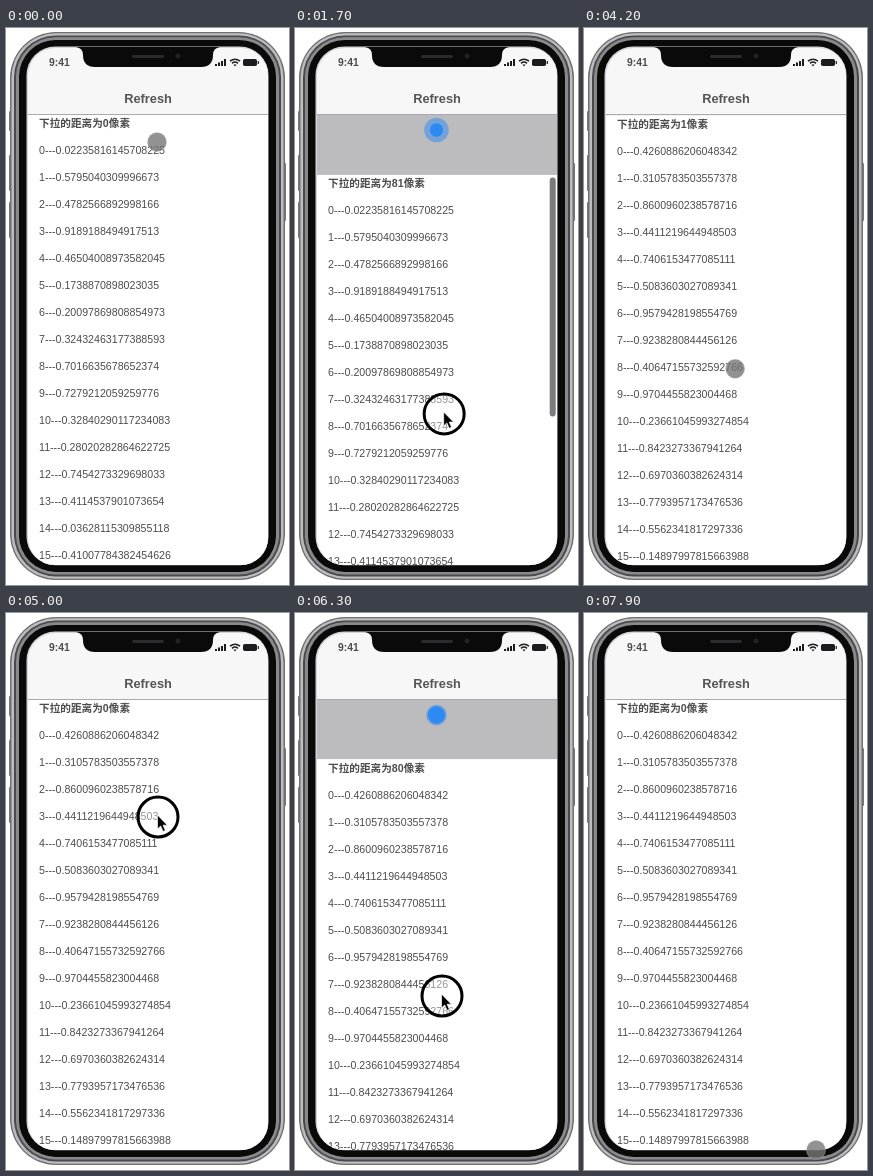
Recreate the animation shown at these times as an HTML page. Size 283x557 px, loop 8000 ms.

```html
<!DOCTYPE html>
<html lang="zh">
<head>
<meta charset="utf-8">
<title>Refresh</title>
<style>
  html, body { margin: 0; width: 100%; height: 100%; overflow: hidden; background: #fff; }
  svg { display: block; width: 283px; height: 557px; }
  text { font-family: "Liberation Sans", "Noto Sans CJK SC", "Noto Sans CJK", sans-serif; font-size: 10.65px; fill: #4c4c4c; }
  .bold { font-weight: bold; }
</style>
</head>
<body>
<svg viewBox="0 0 283 557">
  <defs>
    <clipPath id="screen"><rect x="22" y="20" width="240" height="517" rx="27"/></clipPath>
  </defs>

  <!-- phone body -->
  <g fill="#77777b">
    <rect x="3" y="83" width="4" height="20" rx="1"/>
    <rect x="3" y="127" width="4" height="36" rx="1"/>
    <rect x="3" y="174" width="4" height="36" rx="1"/>
    <rect x="276" y="135" width="4" height="58" rx="1"/>
  </g>
  <g id="body"></g>

  <!-- screen -->
  <g clip-path="url(#screen)">
    <rect x="22" y="20" width="240" height="517" fill="#bcbcbf"/>
    <g id="dot" fill="#2d8af3">
      <circle id="halo" cx="141.5" cy="102" opacity=".5"/>
      <circle id="core" cx="141.5" cy="102"/>
    </g>
    <g id="list">
      <rect x="22" y="86.5" width="240" height="560" fill="#fff"/>
      <text id="label" class="bold" x="33" y="99"></text>
      <g id="rows"></g>
      <rect id="bar" x="254.7" y="89" width="6" height="239" rx="3" fill="#7c7c7e"/>
    </g>
    <rect x="22" y="20" width="240" height="66" fill="#f7f7f8"/>
    <rect x="22" y="86" width="240" height="1" fill="#aaaaad"/>
    <text class="bold" x="142" y="75" text-anchor="middle" style="font-size:12.8px;fill:#555">Refresh</text>
    <text class="bold" x="43" y="38" style="font-size:10.3px">9:41</text>
    <g fill="#1c1c1e">
      <path d="M209 36h2v2h-2zM212 34.5h2v3.5h-2zM215 33h2v5h-2zM218 31h2v7h-2z"/>
      <path d="M224 33.2q5-4 10 0M226 35.3q3-2.4 6 0" fill="none" stroke="#1c1c1e" stroke-width="1.5"/>
      <path d="M227.4 36.6h3.2L229 38.5z"/>
      <rect x="237" y="31" width="14" height="7" rx="1.8"/>
      <rect x="251.7" y="33" width="1.2" height="3"/>
    </g>
  </g>
  <path d="M70 19h144q-7 1-7 8q0 12-12 12H89q-12 0-12-12q0-7-7-8z" fill="#0a0a0b"/>
  <rect x="126" y="27" width="32" height="3" rx="1.5" fill="#2b2b2d"/>
  <circle cx="172" cy="28" r="2.5" fill="#222226"/>

  <!-- pointer -->
  <g id="pointer">
    <circle id="idle" r="9.5" fill="#777" fill-opacity=".8" stroke="#bbb" stroke-opacity=".4"/>
    <g id="press">
      <circle r="20" fill="#fff" fill-opacity=".4" stroke="#000" stroke-width="3"/>
      <path d="M-.5-2v14l3.2-3 2.3 5.4 2.4-1-2.3-5.2h4.3z" fill="#000" stroke="#fff" stroke-width=".7"/>
    </g>
  </g>
</svg>

<script>
const LOOP = 8000, STEP = 100;
const SCALE = 0.743;            // drawn size of one page pixel
const THRESHOLD = 60;           // pull that triggers a refresh
const GRIP = 204;               // where the finger takes hold of the list
const REFRESHED = 3900;
const el = id => document.getElementById(id);

// Text of the rows before and after the refresh
const before = `0.02235816145708225 0.5795040309996673 0.4782566892998166 0.9189188494917513
  0.46504008973582045 0.1738870898023035 0.20097869808854973 0.32432463177388593
  0.7016635678652374 0.7279212059259776 0.32840290117234083 0.28020282864622725
  0.7454273329698033 0.4114537901073654 0.03628115309855118 0.41007784382454626`;
const after = `0.4260886206048342 0.3105783503557378 0.8600960238578716 0.4411219644948503
  0.7406153477085111 0.5083603027089341 0.9579428198554769 0.9238280844456126
  0.40647155732592766 0.9704455823004468 0.23661045993274854 0.8423273367941264
  0.6970360382624314 0.7793957173476536 0.5562341817297336 0.14897997815663988`;

// Pointer strokes, each easing on from the end of the one before
const strokes = [
  { from: 200, to: 500, x: 152, y: 260 },
  { from: 600, to: 1000, x: 150, y: 272 },
  { from: 1100, to: 1900, x: 149, y: 407 },
  { from: 2000, to: 2500, x: 151, y: 366 },
  { from: 4000, to: 4800, x: 152, y: 204 },
  { from: 5000, to: 6000, x: 147, y: 383 },
  { from: 6300, to: 6800, x: 159, y: 254 },
  { from: 7100, to: 7900, x: 232, y: 537 },
];

const clamp = u => Math.min(1, Math.max(0, u));
const smooth = u => u * u * (3 - 2 * u);
const within = (t, from, to) => t >= from && t < to;
const show = (id, on) => el(id).setAttribute("visibility", on ? "visible" : "hidden");

function pointerAt(t) {
  let x = 151, y = 114;
  for (const s of strokes) {
    const u = smooth(clamp((t - s.from) / (s.to - s.from)));
    x += (s.x - x) * u;
    y += (s.y - y) * u;
  }
  return { x, y };
}

// Rubber band: the further the finger, the less the list follows
function stretch(t) {
  const size = 440, travel = Math.max(0, pointerAt(t).y - GRIP);
  return size * (1 - 1 / (1 + 0.385 * travel / size)) / SCALE;
}

// Spring back after a release
const settle = (t, start, from, to) => to + (from - to) * (1 - clamp((t - start) / 400)) ** 3;

function pullAt(t) {
  if (within(t, 700, 2500) || within(t, 5000, 7200)) return stretch(t);
  if (within(t, 2500, REFRESHED)) return settle(t, 2500, stretch(2500), THRESHOLD);
  if (within(t, REFRESHED, 5000)) return settle(t, REFRESHED, THRESHOLD, 0);
  return t < 700 ? 0 : settle(t, 7200, stretch(7100), 0);
}

// Nested outlines from the metal rim to the edge of the glass
function drawBody() {
  const rims = { 4: "#6f6f73", 5.5: "#bdbdc1", 8: "#4a4a4d", 10: "#8a8a8d", 13: "#0a0a0b", 20.5: "#d4d4d6" };
  el("body").innerHTML = Object.entries(rims).sort((a, b) => a[0] - b[0]).map(([inset, color]) => {
    const d = inset - 4, top = 4 + d * 0.88;
    return `<rect x="${inset}" y="${top}" width="${275 - 2 * d}" height="${548 - 1.78 * d}"
      rx="${46 - d * 1.05}" fill="${color}"/>`;
  }).join("");
}

let shown;
function fillRows(data) {
  if (data === shown) return;
  shown = data;
  el("rows").innerHTML = data.split(/\s+/)
    .map((n, i) => `<text x="33" y="${126 + 27 * i}">${i}---${n}</text>`).join("");
}

function draw(t) {
  const pull = pullAt(t), { x, y } = pointerAt(t);
  const pressed = within(t, 500, 2500) || within(t, 4900, 7200);

  fillRows(t < REFRESHED ? before : after);
  el("label").textContent = `下拉的距离为${Math.round(pull)}像素`;
  el("list").setAttribute("transform", `translate(0 ${pull * SCALE})`);
  el("bar").setAttribute("opacity", t < 700 ? 0 : clamp((2900 - t) / 400));

  const swell = 2.8 * Math.abs(Math.cos(Math.PI * (t - 1700) / 1000));
  el("halo").setAttribute("r", 9.5 + swell);
  el("core").setAttribute("r", 9.5 - swell);
  show("dot", pull >= THRESHOLD);

  el("pointer").setAttribute("transform", `translate(${x} ${y})`);
  show("press", pressed);
  show("idle", !pressed);
}

drawBody();
const start = performance.now();
function frame() {
  const t = (performance.now() - start) % LOOP;
  draw(Math.floor(t / STEP) * STEP);
  requestAnimationFrame(frame);
}
frame();
</script>
</body>
</html>
```
